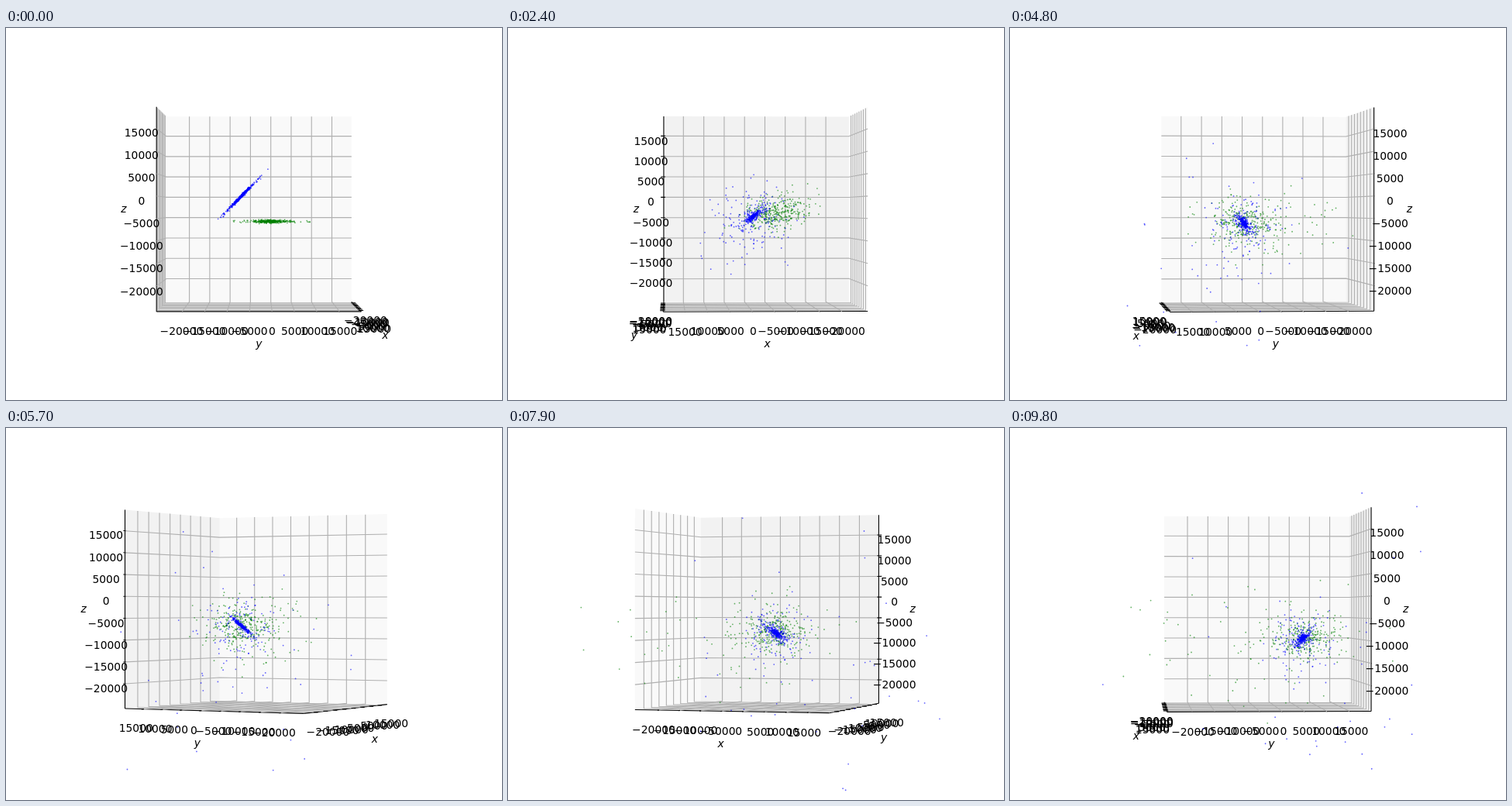
These frames come from a looping animation (640 by 480 pixels, 9900 ms). An HTML page with a canvas:

```html
<!DOCTYPE html>
<html lang="en">
<head>
<meta charset="utf-8">
<title>Colliding discs</title>
<style>
html, body { margin: 0; width: 100%; height: 100%; overflow: hidden; background: #fff; }
canvas { display: block; }
</style>
</head>
<body>
<canvas id="stage" width="640" height="480"></canvas>
<script>
const ctx = document.getElementById('stage').getContext('2d');
const FRAMES = 99, STEP = 100;
const SCALE = 2510, DIST = 10, CX = 326.3, CY = 233.8;
const TICKS = Array.from({ length: 8 }, (_, i) => -20000 + 5000 * i);
const PANES = ['#f9f9f9', '#f2f2f2', '#f5f5f5'];
const NAMES = ['x', 'y', 'z'];
const SIDE = [1, 0, 0]; // coordinate flipped to the front for each axis
const LINE = 1.11;
const FONT = '13.89px "DejaVu Sans", sans-serif';

const toUnit = v => (v + 25680) / 45500 - 0.5;
const withAt = (p, i, v) => p.map((c, k) => k === i ? v : c);
const mix = (a, b, k) => a + (b - a) * k;
const mix3 = (a, b, k) => a.map((c, i) => mix(c, b[i], k));
const smooth = (a, b, t) => {
  const k = Math.min(1, Math.max(0, (t - a) / (b - a)));
  return k * k * (3 - 2 * k);
};

let seed = 4711;
function rand() {
  seed = (seed + 0x6D2B79F5) | 0;
  let r = Math.imul(seed ^ seed >>> 15, 1 | seed);
  r = r + Math.imul(r ^ r >>> 7, 61 | r) ^ r;
  return ((r ^ r >>> 14) >>> 0) / 4294967296;
}
const gauss = () => Math.sqrt(-2 * Math.log(1 - rand())) * Math.cos(2 * Math.PI * rand());

let cosA = 1, sinA = 0;
function project([x, y, z]) {
  const f = SCALE / (DIST - x * cosA - y * sinA);
  return [CX + (y * cosA - x * sinA) * f, CY - z * f];
}

function path(points) {
  ctx.beginPath();
  points.forEach(p => ctx.lineTo(...project(p)));
}

function stroke(points, color) {
  path(points);
  ctx.strokeStyle = color;
  ctx.stroke();
}

// Pushes a point away from the cube centre in every direction but one
const pushOut = (p, skip, d) => p.map((c, k) => k === skip ? c : c + Math.sign(c) * d);

function drawPane(i, back) {
  const j = (i + 1) % 3, k = (i + 2) % 3;
  const corner = (a, b) => withAt(withAt(back, j, a), k, b);
  path([corner(-.5, -.5), corner(.5, -.5), corner(.5, .5), corner(-.5, .5)]);
  ctx.fillStyle = PANES[i];
  ctx.fill();
}

function drawAxis(i, back) {
  const side = SIDE[i];
  const edge = withAt(back, side, -back[side]);
  ctx.lineWidth = LINE;
  stroke([withAt(edge, i, -.5), withAt(edge, i, .5)], '#000');

  ctx.fillStyle = '#000';
  ctx.textAlign = 'center';
  ctx.font = 'italic ' + FONT;
  const [tx, ty] = project(pushOut(withAt(edge, i, 0), i, 0.15));
  ctx.fillText(NAMES[i], tx, ty + 4);

  const j = (i + 1) % 3, k = (i + 2) % 3;
  for (const value of TICKS) {
    const p = withAt(back, i, toUnit(value));
    stroke([withAt(p, j, -p[j]), p, withAt(p, k, -p[k])], '#b0b0b0');
  }

  ctx.font = FONT;
  for (const value of TICKS) {
    const p = withAt(edge, i, toUnit(value));
    stroke([withAt(p, side, p[side] * .984), withAt(p, side, p[side] * 1.032)], '#000');
    const [x, y] = project(pushOut(p, i, 0.069));
    ctx.fillText(String(value).replace('-', '\u2212'), x, y + 11);
  }
}

function makeStars(count, scale, coreShare, haloShare) {
  return Array.from({ length: count }, () => {
    const pick = rand();
    return {
      kind: pick < coreShare ? 'core' : pick < coreShare + haloShare ? 'halo' : 'free',
      radius: Math.min(.2, -scale * Math.log((1 - rand()) * (1 - rand()))),
      angle: rand() * 2 * Math.PI,
      height: gauss() * .004,
      g: [gauss(), gauss(), gauss()],
      u: rand()
    };
  });
}
const blue = makeStars(430, .03, .69, .21);
const green = makeStars(340, .035, .36, .49);

const centre = t => [.027, -.015 + .0224 * t, .0015 - .0156 * t];
function separation(t) {
  const k = Math.cos(2 * t) * Math.exp(-t / 1.4);
  return [.04 * Math.sin(t) * Math.exp(-t / 3), -.076 * k, .064 * k];
}

const turn = ([x, y, z], a) => [
  x * Math.cos(a) - y * Math.sin(a), x * Math.sin(a) + y * Math.cos(a), z
];

function discPoint(s, t, shrink, u, v, n) {
  const a = s.angle + t * .1 / (s.radius + .03);
  const r = s.radius * shrink;
  const p = r * Math.cos(a), q = r * Math.sin(a);
  return u.map((c, i) => c * p + v[i] * q + n[i] * s.height);
}

function blueOffset(s, t) {
  const bind = smooth(.9, 2.2, t);
  const u = mix3([0, .7, .71], [-.35, .65, .6], bind);
  const v = mix3([1, 0, 0], [.85, .15, -.35], bind);
  const disc = discPoint(s, t, 1 - .45 * bind, u, v, [0, -.5, .5]);
  if (s.kind === 'core') return disc;
  if (s.kind === 'halo') {
    const halo = turn([s.g[0] * .095, s.g[1] * .095, s.g[2] * .085 - .01], t * .4);
    return mix3(disc, halo, bind);
  }
  const k = .085 * Math.max(0, t - 1.1) ** .75;
  const bias = [.4, .4, -.5];
  return disc.map((c, i) => c + (s.g[i] + bias[i]) * k);
}

function greenOffset(s, t) {
  const bind = smooth(1.4, 3.4, t);
  const disc = discPoint(s, t, 1 - .2 * bind, [1, 0, 0], [0, 1, 0], [0, 0, 1]);
  const pulse = .2 * s.u * Math.exp(-(((t - 2.4) / .8) ** 2));
  if (s.kind === 'free') {
    const reach = .19 * Math.max(0, t - 1) ** .9;
    const along = reach * s.u ** 1.6;
    const wide = .12 * reach;
    return [
      disc[0] - .66 * along + s.g[0] * wide,
      disc[1] - .75 * along + s.g[1] * wide,
      disc[2] - .04 * along + s.g[2] * wide
    ];
  }
  const spread = s.kind === 'core' ? [.05, .05, .04] : [.13, .13, .065];
  const cloud = turn(s.g.map((c, i) => c * spread[i]), t * .3);
  const p = mix3(disc, cloud, bind);
  return [p[0] - pulse, p[1] - pulse * .3, p[2] + pulse * .2 + s.g[2] * pulse * .1];
}

function drawStars(stars, color, offset, sign, t) {
  const c = centre(t), d = separation(t);
  ctx.fillStyle = color;
  for (const s of stars) {
    const o = offset(s, t);
    const [x, y] = project(o.map((v, i) => v + c[i] + sign * d[i]));
    ctx.beginPath();
    ctx.arc(x, y, .9, 0, 2 * Math.PI);
    ctx.fill();
  }
}

function draw(frame) {
  const azimuth = 2 * Math.PI * frame / FRAMES;
  cosA = Math.cos(azimuth);
  sinA = Math.sin(azimuth);
  const back = [cosA < 0 ? .5 : -.5, sinA < 0 ? .5 : -.5, -.5];
  const t = frame * STEP / 1000;

  ctx.fillStyle = '#fff';
  ctx.fillRect(0, 0, 640, 480);
  for (let i = 0; i < 3; i++) drawPane(i, back);
  for (let i = 0; i < 3; i++) drawAxis(i, back);

  ctx.save();
  ctx.beginPath();
  ctx.rect(80, 0, 480, 480);
  ctx.clip();
  ctx.globalAlpha = .6;
  drawStars(green, '#008000', greenOffset, -1, t);
  drawStars(blue, '#0000ff', blueOffset, 1, t);
  ctx.restore();
}

const start = performance.now();
let shown = -1;
function tick() {
  const frame = Math.floor((performance.now() - start) / STEP) % FRAMES;
  if (frame !== shown) draw(shown = frame);
  requestAnimationFrame(tick);
}
tick();
</script>
</body>
</html>
```
